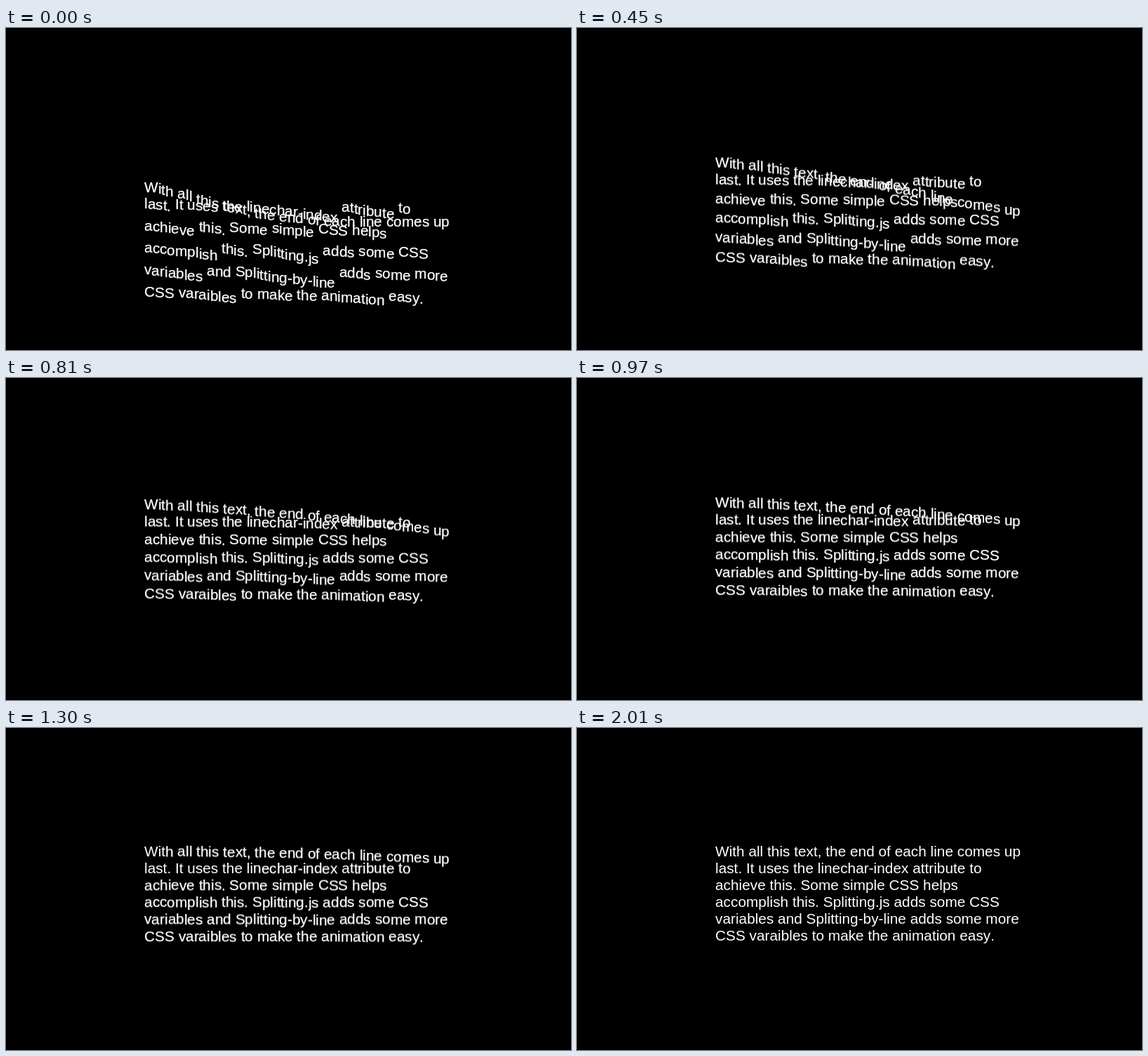
Recreate the animation shown at these times as an HTML page. Size 805 by 459 pixels, loop 2750 ms.

```html
<!DOCTYPE html>
<html lang="en">
<head>
<meta charset="utf-8">
<title>Text rising by line</title>
<style>
  html, body { margin: 0; width: 100%; height: 100%; overflow: hidden; background: #000; }
  #text {
    position: absolute; left: 197px; top: 164px;
    color: #fff; white-space: pre;
    font: 20.8px/24px "Liberation Sans", Arial, sans-serif;
    font-kerning: none; font-variant-ligatures: none;
  }
  .line { height: 24px; }
  .line span { display: inline-block; }
  /* Letters look slightly heavier while they move. */
  .line .moving { will-change: transform; -webkit-text-stroke: 0.25px #fff; }
</style>
</head>
<body>
<div id="text"></div>
<script>
const LINES = [
  'With all this text, the end of each line comes up',
  'last. It uses the linechar-index attribute to',
  'achieve this. Some simple CSS helps',
  'accomplish this. Splitting.js adds some CSS',
  'variables and Splitting-by-line adds some more',
  'CSS varaibles to make the animation easy.'
];
const LOOP = 2750;
const RISE = 100;       // px each letter travels
const DURATION = 1770;
const START = -522;     // the letters are already moving when the loop begins
const FIRST_STEP = 15;  // ms per character in the first line
const STEP = 9.6;       // ms per word and per letter in the other lines

// The picture advances at a low frame rate.
const TICKS = [0, 80, 180, 270, 360, 450, 540, 630, 720, 800, 890, 970, 1050, 1120,
  1210, 1300, 1390, 1480, 1570, 1650, 1740, 1830, 1920, 2010];

const bezier = (a, b, u) => 3 * a * u * (1 - u) ** 2 + 3 * b * u * u * (1 - u) + u ** 3;

// cubic-bezier(.25, .1, .25, 1)
function ease(x) {
  if (x <= 0) return 0;
  if (x >= 1) return 1;
  let lo = 0, hi = 1;
  for (let i = 0; i < 24; i++) {
    const mid = (lo + hi) / 2;
    if (bezier(0.25, 0.25, mid) < x) lo = mid; else hi = mid;
  }
  return bezier(0.1, 1, lo);
}

const letters = [];

function addLetter(parent, char, delay) {
  const el = document.createElement('span');
  el.textContent = char;
  parent.append(el);
  letters.push({ el, start: START + delay });
}

function build() {
  const root = document.getElementById('text');
  let wordIndex = 0;
  LINES.forEach((line, row) => {
    const div = document.createElement('div');
    div.className = 'line';
    root.append(div);
    let column = 0;
    line.split(' ').forEach((word, w) => {
      if (w) { div.append(' '); column++; }
      [...word].forEach((char, i) => {
        column++;
        addLetter(div, char, row ? (wordIndex + i) * STEP : column * FIRST_STEP);
      });
      if (row) wordIndex++;
    });
  });
}

function draw(time) {
  for (const { el, start } of letters) {
    const p = (time - start) / DURATION;
    const moving = p < 1;
    el.classList.toggle('moving', moving);
    el.style.transform = moving ? `translateY(${(RISE * (1 - ease(p))).toFixed(3)}px)` : 'none';
  }
}

let shown = -1;
const origin = performance.now();

function frame() {
  const t = (performance.now() - origin) % LOOP;
  const tick = TICKS.findLast(v => v <= t) ?? 0;
  if (tick !== shown) draw(shown = tick);
  requestAnimationFrame(frame);
}

build();
frame();
</script>
</body>
</html>
```
